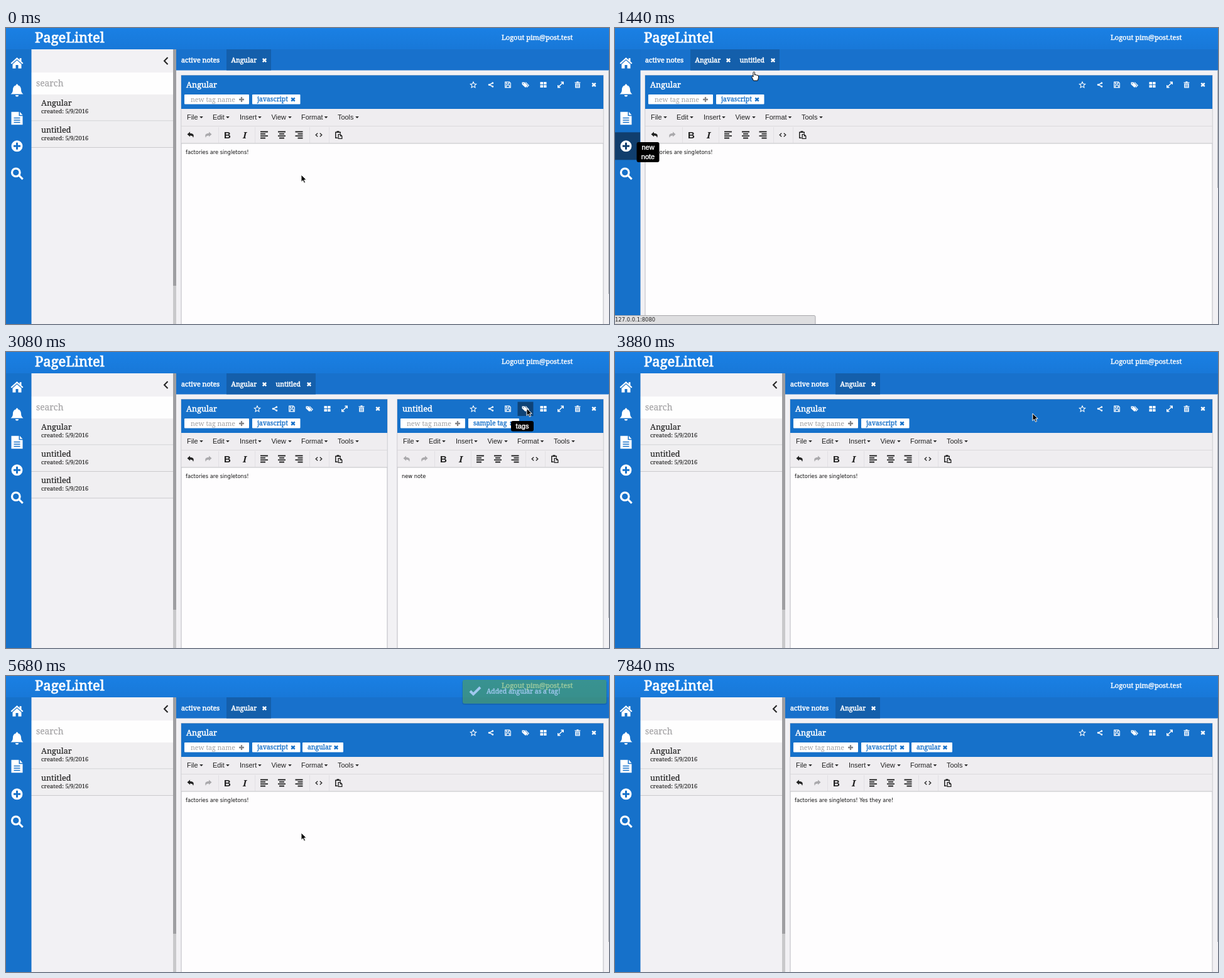
Animation of 960x472 px, one loop 7860 ms. Source, as an HTML page:

```html
<!DOCTYPE html>
<html lang="en">
<head>
<meta charset="utf-8">
<title>Note app</title>
<style>
html, body { margin: 0; width: 100%; height: 100%; overflow: hidden; background: #f2f1f4; }
svg { display: block; width: 960px; height: 472px; }
text { font-family: "Noto Serif", serif; }
.ui { font-family: "Liberation Sans", Arial, sans-serif; }
.body { font-family: "DejaVu Sans", Verdana, sans-serif; }
</style>
</head>
<body>
<svg id="stage" viewBox="0 0 960 472"></svg>
<script>
const LOOP = 7860;
const stage = document.getElementById('stage');
const pen = document.createElement('canvas').getContext('2d');
const BLUE = '#1671ca';

// Icon paths, centred on 0,0; "line" icons are stroked.
const FILLED = {
  home: 'M0-9L-10 0l1.500 1.500L0-6l8.500 7.500L10 0 7-2.700V-8H4.200v2.800zM-7 1.800V8.500h5V3h4v5.500h5V1.800L0-4.500z',
  bell: 'M0-10.500c1 0 1.500.7 1.500 1.600C5-8 6.500-5 6.500-2c0 4 1.500 6 3.500 7.500h-20C-8 4-6.500 2-6.500-2-6.500-5-5-8-1.500-8.900-1.500-9.800-1-10.500 0-10.500zM-2.500 7h5a2.500 2.500 0 0 1-5 0z',
  doc: 'M-9-10.500H3v6.500h6v14H-9zM4.500-10.500L9-5.500H4.500zM-5-1.500H5V0H-5zM-5 2H5v1.500H-5zM-5 5.500H5V7H-5z',
  add: 'M-9 0a9 9 0 1 0 18 0a9 9 0 1 0-18 0zM-1.500-5.500h3v4h4v3h-4v4h-3v-4h-4v-3h4z',
  tags: 'M-5.500-4h4l5 5-3.500 3.500-5.500-5zM-4-2.500v1.200h1.200v-1.200zM-.5-4H1l5 5-3.500 3.500-.9-.9L4.500 1z',
  grid: 'M-5-4.500h4.500v4H-5zM.5-4.500H5v4H.5zM-5 .5h4.500v4H-5zM.5.5H5v4H.5z',
  trash: 'M-4.500-4h3v-1.200h3V-4h3v1.200h-9zM-3.800-2h7.600v7h-7.600zM-2.200-1v5h.8v-5zM-.4-1v5h.8v-5zM1.400-1v5h.8v-5z',
  undo: 'M-5.500-1l4.500-4v2.500c5 0 7 2.500 5 7-.5-2.700-2-3.500-5-3.500v2z',
  redo: 'M5.500-1l-4.500-4v2.500c-5 0-7 2.500-5 7 .5-2.700 2-3.500 5-3.500v2z',
  paste: 'M-5.500-5h2.500v-1.200h4V-5h2.500v3H2v-1.500h-6V4h2.500v1.500h-4zM-1-1.500h4l3 3v5h-7zM.3-.2v5.400h4.400v-3H2.300v-2.400z',
  down: 'M-2.800-1.500h5.600L0 1.500z'
};
const LINED = {
  search: [3.2, 'M-8-2a6.300 6.300 0 1 0 12.600 0a6.300 6.300 0 1 0-12.600 0M3.500 3L9.200 8.700'],
  close: [2.400, 'M-2.700-2.700L2.700 2.700M2.700-2.700L-2.700 2.700'],
  plus: [2.300, 'M-4 0H4M0-4V4'],
  star: [1.100, 'M0-4.600L1.400-1.500 4.700-1.100 2.200 1.200 2.900 4.500 0 2.800-2.900 4.500-2.200 1.200-4.700-1.100-1.400-1.500z'],
  share: [1.500, 'M2.700-2.700L-2.800 0 2.700 2.700' +
    [[-2.800, 0], [2.700, -2.700], [2.700, 2.700]].map(([x, y]) => `M${x - .8} ${y}a.8 .8 0 1 0 1.600 0a.8 .8 0 1 0-1.600 0`).join('')],
  save: [1.200, 'M-4.300-4.300H2.500L4.300-2.500V4.300H-4.300zM-2.200-4v2.800h3.800V-4M-2.500 4V1h5v3'],
  expand: [1.500, 'M-3.500 3.500L3.500-3.500M.5-4.200H4.200V-.5M-.5 4.200H-4.200V.5'],
  code: [1.300, 'M-1.800-2.800L-4.800 0-1.800 2.800M1.800-2.800L4.800 0 1.800 2.800'],
  left: [1.800, 'M-6-5H6M-6-1.700H2M-6 1.700H6M-6 5H2'],
  center: [1.800, 'M-6-5H6M-4-1.700H4M-6 1.700H6M-4 5H4'],
  right: [1.800, 'M-6-5H6M-2-1.700H6M-6 1.700H6M-2 5H6'],
  back: [2, 'M2.500-5.500L-3 0 2.500 5.500'],
  check: [4, 'M-8 0L-3 5 8-6']
};

const rect = (x, y, w, h, fill, more = '') =>
  `<rect x="${x}" y="${y}" width="${w}" height="${h}" fill="${fill}" ${more}/>`;
const text = (s, x, y, size, fill, more = '') =>
  `<text x="${x}" y="${y}" font-size="${size}" fill="${fill}" ${more}>${s}</text>`;
const medium = (s, x, y, size, fill, w = 0.4) =>
  text(s, x, y, size, fill, `stroke="${fill}" stroke-width="${w}"`);
const ui = (s, x, y, size, fill, more = '') => text(s, x, y, size, fill, 'class="ui" ' + more);
const move = (x, y, inner, more = '') => `<g transform="translate(${x} ${y})" ${more}>${inner}</g>`;

function icon(name, x, y, color) {
  if (FILLED[name]) return move(x, y, `<path d="${FILLED[name]}" fill="${color}" fill-rule="evenodd"/>`);
  const [w, d] = LINED[name];
  return move(x, y, `<path d="${d}" fill="none" stroke="${color}" stroke-width="${w}"/>`);
}

const within = (t, a, b) => t >= a && t < b;
const ramp = (t, a, b) => Math.max(0, Math.min(1, (t - a) / (b - a)));
const ease = k => k * k * (3 - 2 * k);
const typed = (s, t, a, b) => s.slice(0, Math.floor(ramp(t, a, b) * s.length));

// Pointer stops: time, x, y
const PATH = [
  [0, 470, 234], [60, 470, 234], [350, 251, 50], [440, 251, 50], [760, 15, 186],
  [1240, 15, 186], [1440, 221, 70], [1520, 224, 66], [2080, 851, 88], [2240, 851, 88],
  [2540, 14, 141], [2660, 14, 141], [3040, 829, 90], [3160, 829, 90], [3420, 907, 88],
  [3720, 907, 88], [4080, 332, 112], [4700, 332, 112], [4960, 487, 123], [5020, 487, 123],
  [5340, 500, 420], [5620, 470, 250], [5720, 470, 250]
];
const ADDED = 1220, SPLIT = 2160, REMOVED = 3700, TAGGED = 4720, WRITE = 5720, WRITTEN = 6480;
const GAP = 16;

function pointer(t) {
  const i = PATH.findIndex(p => p[0] > t);
  if (i < 1) return '';
  const [a, x, y] = PATH[i - 1], [b, u, v] = PATH[i];
  const k = ease(ramp(t, a, b));
  const hand = within(t, 730, 1540) || within(t, 2510, 2690);
  const d = hand
    ? 'M-1 1.500c0-2 2.500-2 2.500 0v3.500l1.500-.5 1.500.8 1.500 0 1.500 1.200v3l-1.500 4.500H-.5L-3 8.800c-1-1.500 0-2.500 1-1.800l1 1z'
    : 'M0 0V11.500l2.700-2.500 1.900 4.300 2-.9-1.900-4.200h3.600z';
  const fill = hand ? '#fff' : '#000', line = hand ? '#000' : '#fff';
  return move(x + (u - x) * k, y + (v - y) * k,
    `<path d="${d}" fill="${fill}" stroke="${line}" stroke-width="1" stroke-linejoin="round"/>`);
}

function tip(lines, cx, y) {
  const h = lines.length * 15.500 + 1;
  return rect(cx - 18, y, 36, h, '#000', 'rx="3"') +
    lines.map((s, i) => ui(s, cx, y + 12 + i * 15.200, 11, '#fff',
      'text-anchor="middle" stroke="#fff" stroke-width=".4"')).join('');
}

const ACTIONS = { star: 207, share: 179, save: 152, tags: 124, grid: 95.500, expand: 68, trash: 41, close: 15 };
const MENU = [['File', 9, 32], ['Edit', 50, 74], ['Insert', 93, 125], ['View', 143.500, 173], ['Format', 191, 230.500], ['Tools', 249, 280]];
const TOOLS = { undo: 15, redo: 43, left: 132, center: 160, right: 187.500, code: 219, paste: 250.500 };

function note(n, x, w) {
  const ink = '#222';
  let s = rect(x, 75.500, w, 420, '#fefdfe', 'stroke="#b9bac0"') +
    rect(x, 75.500, w, 53.500, BLUE) +
    rect(x + .5, 129, w - 1, 55, '#efedf0') +
    rect(x, 156, w, 1, '#dad9dc') + rect(x, 183.500, w, 1, '#c2c1c5') +
    medium(n.title, x + 8, 94.500, 12.700, '#fff', .5);

  for (const [name, gap] of Object.entries(ACTIONS)) {
    const cx = x + w - gap;
    if (n.hover === name) s += rect(cx - 12.500, 79.500, 25, 22.500, '#0e4377');
    s += icon(name, cx, 90.500, '#fff');
  }

  s += rect(x + 5, 106, 103, 15.500, '#fff', 'rx="1"') +
    (n.entry ? text(n.entry, x + 15, 117.500, 10.600, '#333') : text('new tag name', x + 15, 117.500, 10.600, '#a0a0a2')) +
    icon('plus', x + 96, 114, '#858587');
  let tx = x + 113;
  for (const [label, tw] of n.tags) {
    s += rect(tx, 106, tw, 15.500, '#fff', 'rx="1"') +
      medium(label, tx + 8, 117.300, 10.400, BLUE, .35) + icon('close', tx + tw - 11.500, 114, BLUE);
    tx += tw + 3.500;
  }

  for (const [label, mx, cx] of MENU) s += ui(label, x + mx, 146, 10.900, ink) + icon('down', x + cx, 142.500, ink);
  for (const gap of [59, 117, 204, 235]) s += rect(x + gap, 158, 1, 25, '#e2e0e4');
  for (const [name, gap] of Object.entries(TOOLS)) {
    const off = name === 'redo' || (name === 'undo' && n.fresh);
    s += icon(name, x + gap, 170.500, off ? '#aaa9ac' : ink);
  }
  s += ui('B', x + 73.500, 176, 15, ink, 'font-weight="bold" text-anchor="middle"') +
    text('I', x + 101, 176, 15, ink, 'font-style="italic" font-weight="bold" text-anchor="middle"') +
    text(n.body, x + 7, 200.800, 8.300, '#111', 'class="body"');
  if (n.caret) {
    pen.font = '8.3px "DejaVu Sans", Verdana, sans-serif';
    s += rect(x + 7.500 + pen.measureText(n.body).width, 192.500, 1, 10.500, '#000');
  }
  return s;
}

function panel(items) {
  let s = rect(40, 34, 226, 438, '#f2f1f4') + rect(40, 71, 226, 35, '#fefefe') +
    icon('back', 255, 52.500, '#222') + medium('search', 48, 92.500, 13.800, '#a5a4a6', .25) +
    rect(266, 34, 5, 438, '#c9c9cb') + rect(266, 34, 5, 377, '#9e9ea1');
  items.forEach((name, i) => {
    const y = 106 + i * 42.500;
    s += rect(40, y, 226, 42, '#f0eff1') + rect(40, y + 41.500, 226, 1, '#cbcacd') +
      medium(name, 56, y + 18, 12.600, '#222', .2) + medium('created: 5/9/2016', 56, y + 30, 9.350, '#222', .15);
  });
  return s;
}

function tabs(left, names) {
  let s = rect(left, 34, 960 - left, 33.500, '#1871cc') + medium('active notes', left + 8, 54.800, 10.800, '#fff', .5);
  names.forEach((name, i) => {
    const x = left + 80 + i * 71;
    s += rect(x, 34, 71, 33.500, '#145fab') + medium(name, x + 7.500, 54.800, 10.500, '#fff', .5) +
      icon('close', x + 60.500, 51.500, '#fff');
  });
  return s;
}

function rail(hover) {
  const names = ['home', 'bell', 'doc', 'add', 'search'];
  return rect(0, 34, 40.500, 438, BLUE) + names.map((name, i) => {
    const y = 56 + i * 44.100;
    return (name === hover ? rect(0, y - 22, 40, 44, '#103e6d') : '') + icon(name, 17.500, y, '#fff');
  }).join('');
}

function toast(alpha) {
  return `<g opacity="${alpha}">` + rect(726, 7, 231, 39, '#000', 'rx="4" opacity=".18"') +
    rect(727, 6, 229, 38, '#51a355', 'rx="3" opacity=".97"') + icon('check', 747, 24, '#fff') +
    medium('Added angular as a tag!', 765, 28, 10.500, '#fff', .35) + '</g>';
}

function scene(t) {
  const open = t < 1500 ? 1 - ease(ramp(t, 400, 480)) : ease(ramp(t, 2600, 2680));
  const left = 40 + 231 * open;
  const extra = within(t, ADDED, REMOVED), split = within(t, SPLIT, REMOVED);
  const gridTip = within(t, 2080, 2240), tagTip = within(t, 3040, 3180), newTip = within(t, 780, 1500);

  const full = 951 - (left + 8), w = split ? (full - GAP) / 2 : full;
  const first = {
    title: 'Angular',
    tags: [['javascript', 76.500], ['angular', 65]].slice(0, t < TAGGED ? 1 : 2),
    entry: t < TAGGED ? typed('angular', t, 4160, 4640) : '',
    body: 'factories are singletons!' + typed(' Yes they are!', t, WRITE, WRITTEN),
    caret: t >= WRITE && (t < 6600 || Math.floor((t - 6600) / 110) % 2 === 0),
    hover: gridTip ? 'grid' : ''
  };
  const second = {
    title: 'untitled', tags: [['sample tag', 81]], body: 'new note', fresh: true,
    hover: tagTip ? 'tags' : within(t, 3380, REMOVED) ? 'trash' : ''
  };

  let s = rect(0, 0, 960, 472, '#f2f1f4') + tabs(left, extra ? ['Angular', 'untitled'] : ['Angular']) +
    rect(959, 68, 1, open < .5 && !split ? 187 : 356, '#a9adb3') + note(first, left + 8, w);
  if (split) s += note(second, left + 8 + w + GAP, w);
  s += move(left - 271, 0, panel(['Angular', 'untitled', 'untitled'].slice(0, extra ? 3 : 2))) +
    rail(newTip ? 'add' : within(t, 2530, 2680) ? 'doc' : '') +
    rect(0, 0, 960, 34, 'url(#bar)') +
    medium('PageLintel', 46, 22.500, 22, '#fff', .8) +
    medium('Logout pim@post.test', 789, 19, 11, '#fff', .4);

  if (newTip) {
    s += tip(['new', 'note'], 52.500, 182) +
      rect(-2, 458.500, 321, 16, '#dedee0', 'rx="2" stroke="#a9a9ac"') +
      text('127.0.0.1:8080', 0, 468, 8.400, '#222', 'class="body"');
  }
  if (gridTip) s += tip(['grid', 'view'], left + 8 + w - 98.500, 110);
  if (tagTip) s += tip(['tags'], 822, 110);
  const alpha = ramp(t, 4740, 4800) * (1 - ramp(t, 5640, 5740));
  if (alpha > 0) s += toast(alpha);
  return s + pointer(t);
}

const DEFS = '<defs><linearGradient id="bar" x2="0" y2="1"><stop stop-color="#1a80e4"/>' +
  '<stop offset="1" stop-color="#1878d8"/></linearGradient></defs>';
const start = performance.now();
let shown = '';
function frame() {
  const next = scene((performance.now() - start) % LOOP);
  if (next !== shown) stage.innerHTML = DEFS + (shown = next);
  requestAnimationFrame(frame);
}
frame();
</script>
</body>
</html>
```
